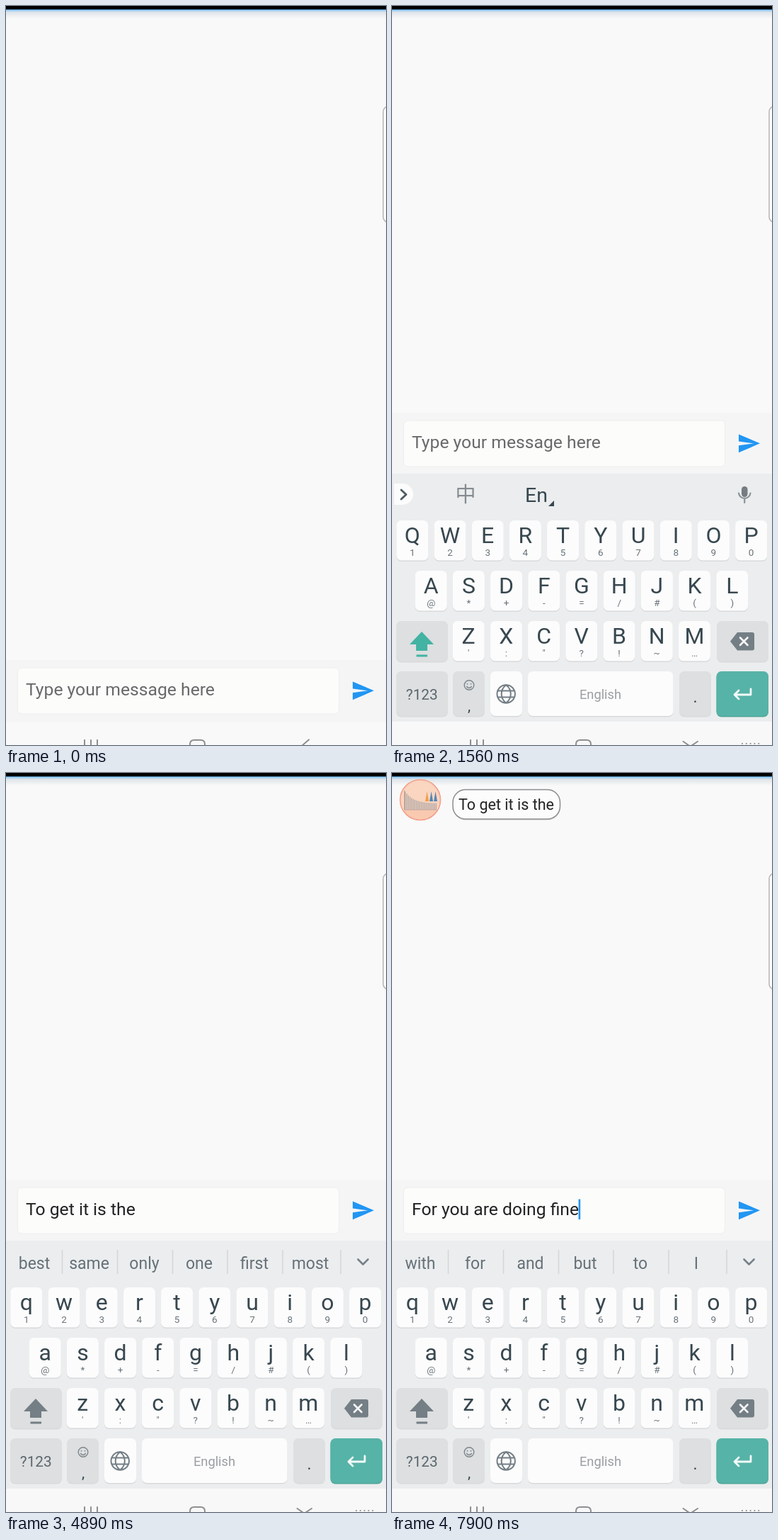
Animation, 537 px wide and 1043 px high, one loop 8 s. Source, as an HTML page:

```html
<!DOCTYPE html>
<html lang="en">
<head>
<meta charset="utf-8">
<title>Chat keyboard</title>
<style>
  html, body { margin: 0; width: 100%; height: 100%; overflow: hidden; background: #f9f9f9; }
  svg { display: block; width: 100%; height: 100%; }
  text { font-family: Roboto, "Noto Sans CJK SC", sans-serif; }
  .mid { text-anchor: middle; }
  .line { fill: none; stroke-linecap: round; stroke-linejoin: round; }
</style>
</head>
<body>
<svg id="stage" viewBox="0 0 537 1043" preserveAspectRatio="none">
  <defs>
    <linearGradient id="barShade" x1="0" y1="0" x2="0" y2="1">
      <stop offset="0" stop-color="#2f8fdc"/>
      <stop offset=".17" stop-color="#9fcdf0"/>
      <stop offset=".35" stop-color="#e0e5ea"/>
      <stop offset="1" stop-color="#f9f9f9"/>
    </linearGradient>
    <linearGradient id="popShade" x1="0" y1="0" x2="0" y2="1">
      <stop offset="0" stop-color="#dcdddd"/>
      <stop offset="1" stop-color="#d5d7d8"/>
    </linearGradient>
    <filter id="soft" x="-30%" y="-30%" width="160%" height="160%">
      <feDropShadow dx="0" dy="2" stdDeviation="3" flood-color="#5a6068" flood-opacity=".45"/>
    </filter>
    <clipPath id="round"><circle cx="40" cy="38" r="28"/></clipPath>
  </defs>

  <rect width="537" height="1043" fill="#f9f9f9"/>
  <rect y="4" width="537" height="14" fill="url(#barShade)"/>
  <rect width="537" height="4.8" fill="#000"/>

  <g id="message">
    <circle cx="40" cy="38" r="28.5" fill="#fad5c0"/>
    <g id="avatar" clip-path="url(#round)"></g>
    <circle cx="40" cy="38" r="28.5" fill="none" stroke="#f3a08a" stroke-width="1.6"/>
    <rect x="86" y="24.5" width="152" height="42" rx="18" fill="#d9d9da"/>
    <rect x="86" y="23.5" width="151.5" height="41.5" rx="18" fill="#fcfcfc" stroke="#8c8c8e" stroke-width="1.5"/>
    <text x="94" y="51.5" font-size="21.55" fill="#242424">To get it is the</text>
  </g>

  <rect x="533" y="142" width="20" height="163" rx="7" fill="#fcfcfc" stroke="#b4b4b6" stroke-width="1.5"/>

  <g id="composer">
    <rect y="574" width="537" height="87" fill="#f5f5f6"/>
    <rect x="16.5" y="585" width="454" height="65" rx="6" fill="#fcfcfb" stroke="#eeeeef"/>
    <text id="hint" x="28" y="623.5" font-size="24.7" fill="#69696a">Type your message here</text>
    <text id="typed" x="28" y="623.5" font-size="24.7" fill="#222"></text>
    <rect id="caret" y="601.5" width="2.6" height="28.5" fill="#2196f3"/>
    <path transform="translate(487.1 600.2) scale(1.43)" d="M2 21L23 12 2 3V10L17 12 2 14z" fill="#2196f3"/>
  </g>

  <g id="keyboard">
    <rect y="660" width="537" height="351" fill="#ebedee"/>
    <rect y="1010" width="537" height="440" fill="#f8f8f8"/>
    <g id="langBar">
      <path d="M3 674H15A15 15 0 0 1 15 704H3z" fill="#fcfcfc"/>
      <path class="line" d="M13 683L20 689.5 13 696" stroke="#4d5a63" stroke-width="2.8"/>
      <text class="mid" x="104" y="700" font-size="29" fill="#858c91">中</text>
      <text x="188" y="699.5" font-size="28.5" fill="#37474f">En</text>
      <path d="M229 698V706H221z" fill="#37474f"/>
      <rect x="494" y="678" width="8.5" height="15" rx="4.2" fill="#757c82"/>
      <path class="line" d="M490 687.5A8.3 8.3 0 0 0 506.5 687.5M498.2 696V701" stroke="#8b9196" stroke-width="2.2"/>
    </g>
    <g id="wordBar">
      <path class="line" d="M497.5 686.5L504.5 693.5 511.5 686.5" stroke="#768088" stroke-width="2.6"/>
    </g>
    <g id="keys"></g>
    <g id="popup">
      <rect x="161.5" y="627" width="53.5" height="157" rx="7" fill="url(#popShade)" filter="url(#soft)"/>
      <text class="mid" x="187" y="680.5" font-size="35" fill="#37474f">R</text>
      <path class="line" d="M197 696H207" stroke="#4d5a63" stroke-width="2.6" stroke-dasharray="0 4.7"/>
    </g>
  </g>

  <g class="line" stroke="#8f8f92" stroke-width="2">
    <path d="M111 1036V1045M120 1036V1045M129 1036V1045"/>
    <path d="M260 1046V1042Q260 1036 266 1036H275Q281 1036 281 1042V1046"/>
    <path id="back" d="M428 1035.5L417 1045"/>
    <g id="hide">
      <path d="M411.5 1038L421.5 1045 432 1038"/>
      <path d="M495 1041H519" stroke-width="2.2" stroke-dasharray="0 5.8"/>
    </g>
  </g>
</svg>
<script>
const LOOP = 8000, START = performance.now();
const $ = id => document.getElementById(id);

function add(parent, tag, attrs, text) {
  const el = document.createElementNS("http://www.w3.org/2000/svg", tag);
  for (const k in attrs) el.setAttribute(k, attrs[k]);
  if (text) el.textContent = text;
  return parent.appendChild(el);
}
const keys = $("keys");
const label = (x, y, size, fill, text) =>
  add(keys, "text", { x, y, "font-size": size, fill, class: "mid" }, text);
const stroke = (d, color, width) =>
  add(keys, "path", { d, class: "line", stroke: color, "stroke-width": width });

function key(x, y, width, height, fill = "#fcfcfc", edge = "#d8dadc") {
  const box = { x, width, height, rx: 7 };
  add(keys, "rect", { ...box, y: y + 1.5, fill: edge });
  add(keys, "rect", { ...box, y, fill });
}

const PITCH = 53.2, INK = "#37474f", GREY = "#dddfe0", ICON = "#747e85";
const letters = [];
const rows = [
  ["qwertyuiop", "1234567890", 28.8],
  ["asdfghjkl", "@*+-=/#()", 55.2],
  ["zxcvbnm", "':\"?!~…", 108.2]
];
rows.forEach(([chars, hints, left], r) => {
  const y = 726 + r * 71;
  [...chars].forEach((c, i) => {
    const x = left + i * PITCH;
    key(x - 22.5, y, 45, 56.5);
    letters.push([label(x, y + 32, 32, INK, c), c]);
    label(x, y + 50, 13.5, "#687279", hints[i]);
  });
});

// Function keys
key(6, 868, 73, 57, GREY);
const shift = add(keys, "path", { d: "M42 883L59 901H50V910H34V901H25zM34.5 915.5H50V918.5H34.5z" });
key(459, 868, 73, 57, GREY);
add(keys, "path", { d: "M488 884H509Q512 884 512 887V906.5Q512 909.5 509 909.5H488L478 896.7z", fill: ICON });
stroke("M492 891.5L502.5 902M502.5 891.5L492 902", "#f4f5f6", 2.6);

key(6, 939, 73, 63, GREY);
label(42.3, 979, 20.8, "#5b666d", "?123");
key(86, 939, 45, 63, GREY);
add(keys, "circle", { cx: 109, cy: 958.5, r: 6.8, class: "line", stroke: "#7d868c", "stroke-width": 1.4 });
stroke("M106.5 956.5V957M111.5 956.5V957M105.5 960.5Q109 964.5 112.5 960.5", "#7d868c", 1.5);
label(109, 995, 21, INK, ",");
key(139, 939, 45, 63);
stroke("M148.5 971A12.7 12.7 0 1 0 173.9 971A12.7 12.7 0 1 0 148.5 971M161.2 958.3C152.5 965 152.5 977 161.2 983.7C170 977 170 965 161.2 958.3M150 966.5H172.5M150 975.5H172.5", ICON, 2);
key(192, 939, 205.5, 63);
label(294.5, 978, 18.3, "#9a9ea3", "English");
key(406, 939, 45, 63, GREY);
label(428.5, 983, 23, INK, ".");
key(458.5, 939, 73.5, 63, "#56b3a7", "#4ea598");
stroke("M507 964V972H484M490 966L484 972 490 978", "#f4fbfa", 2.8);

// Suggestion strip
const words = [40, 117.5, 195.5, 273, 351, 430].map(x =>
  add($("wordBar"), "text", { x, y: 699.5, "font-size": 23, fill: "#667178", class: "mid" }));
[79.5, 157.5, 235.5, 313, 391, 473].forEach(x =>
  add($("wordBar"), "path", { d: `M${x} 673V707`, stroke: "#d3d6d9", "stroke-width": 1.5 }));

// Avatar: a small decaying chart
add($("avatar"), "rect", { x: 10, y: 53, width: 60, height: 16, fill: "#f9c9b0" });
for (let i = 0; i < 20; i++) {
  const h = 9 + 17 * Math.exp(-i / 5);
  add($("avatar"), "rect", { x: 18 + i * 2.3, y: 52 - h, width: 1.2, height: h, fill: "#a9a4a4" });
}
add($("avatar"), "path", { d: "M17.5 25V52H63", class: "line", stroke: "#c9a296", "stroke-width": 1 });
[["#f0a04a", 47], ["#5387b5", 53], ["#5387b5", 59]].forEach(([fill, x]) =>
  add($("avatar"), "path", { d: `M${x} 40L${x + 2.5} 26 ${x + 5} 40z`, fill }));

const OPENING = "To The And For In Is";
// [time, field text, suggestions, key popup]
const edits = [
  [760, "", ""],
  [2180, "", "The R Re That This Or", true],
  [2390, "R", "The R Re That This Or"],
  [2700, "", OPENING],
  [3010, "To", "the be get do you see"],
  [3540, "To get", "the a to it my in"],
  [3850, "To get it", "is to and for in out"],
  [4160, "To get it is", "the a not to in my"],
  [4470, "To get it is the", "best same only one first most"],
  [5410, "", OPENING],
  [6340, "For", "the you a me my this"],
  [6550, "For you", "to and are can have will"],
  [6960, "For you are", "the doing not going a in"],
  [7280, "For you are doing", "well it good fine this the"],
  [7690, "For you are doing fine", "with for and but to I"]
];

const slide = (t, start, length, range) =>
  range * (1 - Math.min(1, Math.max(0, (t - start) / length))) ** 3;
const show = (el, on) => el.setAttribute("visibility", on ? "visible" : "hidden");
const move = (el, y) => el.setAttribute("transform", `translate(0 ${y.toFixed(2)})`);

function draw(t) {
  const current = edits.filter(e => e[0] <= t).pop();
  const [, text, list] = current || [0, "", ""];
  const typing = t >= 2180;

  move($("composer"), slide(t, 780, 485, 349));
  move($("keyboard"), slide(t, 820, 530, 384));
  show($("keyboard"), t >= 820);
  show($("back"), t < 820);
  show($("hide"), t >= 820);

  $("langBar").style.display = typing ? "none" : "";
  $("wordBar").style.display = typing ? "" : "none";
  const options = list.split(" ");
  words.forEach((el, i) => el.textContent = options[i] || "");
  letters.forEach(([el, c]) => el.textContent = typing ? c : c.toUpperCase());
  shift.setAttribute("fill", typing ? ICON : "#43b3a3");
  show($("popup"), current && current[3]);

  show($("hint"), !text);
  $("typed").textContent = text;
  $("caret").setAttribute("x", 27.5 + (text ? $("typed").getComputedTextLength() : 0));
  // The opening press leaves the blink running; later edits restart it.
  const since = current ? t - (t < 2390 ? 760 : current[0]) : -1;
  show($("caret"), since >= 0 && since % 1000 < 420);
  show($("message"), t >= 5510);
}

function tick() {
  draw((performance.now() - START) % LOOP);
  requestAnimationFrame(tick);
}
tick();
</script>
</body>
</html>
```
